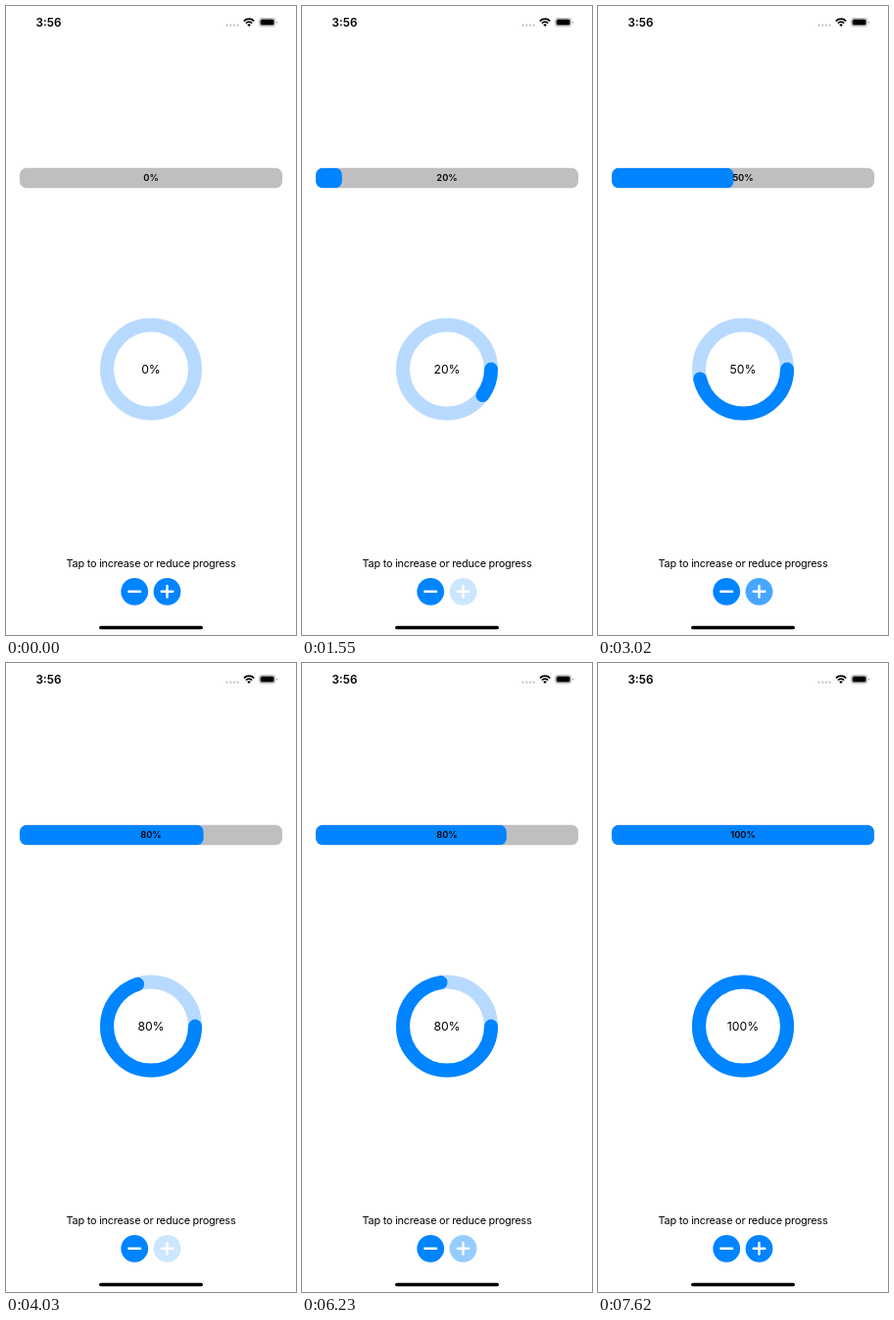
These frames come from a looping animation (296x640 px, 7.69 s). An HTML page:

```html
<!DOCTYPE html>
<html lang="en">
<head>
<meta charset="utf-8">
<title>Progress</title>
<style>
  html, body { margin: 0; width: 100%; height: 100%; overflow: hidden; background: #fff; }
  svg { display: block; width: 296px; height: 640px; }
  text { font-family: Inter, "Liberation Sans", sans-serif; text-anchor: middle; fill: #000; }
  .accent { fill: #0084ff; }
  .glyph { stroke: #fff; stroke-width: 2.4; stroke-linecap: round; }
  .ring { fill: none; stroke-width: 14; }
</style>
</head>
<body>
<svg viewBox="0 0 296 640">
  <defs>
    <clipPath id="barClip"><rect x="14" y="164.7" width="268" height="20.6" rx="7"/></clipPath>
  </defs>

  <text x="43.5" y="21" font-size="11.7" font-weight="600">3:56</text>
  <g fill="#c4c4c6">
    <circle cx="225.4" cy="19.6" r="1.2"/><circle cx="229.2" cy="19.6" r="1.2"/>
    <circle cx="233" cy="19.6" r="1.2"/><circle cx="236.7" cy="19.6" r="1.2"/>
  </g>
  <g fill="none" stroke="#000" stroke-width="1.7">
    <path d="M242.8 15.3a7.3 7.3 0 0 1 10.4 0"/>
    <path d="M244.8 17.5a4.5 4.5 0 0 1 6.4 0"/>
  </g>
  <path d="M246.2 19.1a2.6 2.6 0 0 1 3.6 0L248 21z"/>
  <rect x="258.4" y="12.4" width="16.4" height="8.4" rx="2.5" fill="none" stroke="#a9a9ab" stroke-width=".8"/>
  <rect x="259.6" y="13.6" width="14" height="6" rx="1.5"/>
  <path d="M275.8 15.2q1.2 .4 1.2 1.4t-1.2 1.4z" fill="#a9a9ab"/>

  <g clip-path="url(#barClip)">
    <rect x="14" y="164" width="268" height="22" fill="#bfbfc1"/>
    <rect id="fill" class="accent" x="14" y="164.7" height="20.6" rx="7"/>
  </g>
  <text id="barText" x="148" y="178.3" font-size="9.3" font-weight="600"></text>

  <circle class="ring" cx="148" cy="369.6" r="45" stroke="#b8daff"/>
  <circle id="arc" class="ring" cx="148" cy="369.6" r="45" stroke="#0084ff" stroke-linecap="round" pathLength="100"/>
  <text id="ringText" x="148" y="374" font-size="12.2"></text>

  <text x="148" y="571" font-size="10.9" letter-spacing="-.22">Tap to increase or reduce progress</text>
  <g id="minus">
    <circle class="accent" cx="131.2" cy="595.8" r="13.9"/>
    <path class="glyph" d="M125.4 595.8h11.6"/>
  </g>
  <g id="plus">
    <circle class="accent" cx="164.5" cy="595.8" r="13.9"/>
    <path class="glyph" d="M158.7 595.8h11.6M164.5 590v11.6"/>
  </g>
  <rect x="95" y="630.8" width="106" height="3.5" rx="1.75"/>
</svg>
<script>
  const LOOP = 7690, EASE_MS = 350, BAR_WIDTH = 268;
  const $ = id => document.getElementById(id);

  // Taps: touch down, release, change in percent
  const taps = [
    [910, 945, 10], [1550, 1550, 10], [1940, 1945, 10], [2400, 2400, 10],
    [2800, 2815, 10], [3240, 3250, 10], [3640, 3645, 10], [4020, 4020, 10],
    [5070, 5180, -10], [6020, 6105, 10], [6600, 6660, 10], [7040, 7150, 10]
  ];

  // Bursts of screen updates: first, last, count
  const bursts = [
    [910, 1350, 5], [1550, 2310, 8], [2420, 2660, 3], [2800, 3460, 7], [3580, 4240, 7],
    [4350, 4470, 2], [5070, 5650, 6], [6020, 6450, 5], [6600, 7270, 7], [7390, 7620, 3]
  ];
  const ticks = [0, ...bursts.flatMap(([from, to, n]) =>
    Array.from({ length: n }, (_, i) =>
      Math.floor((from * (n - 1) + (to - from) * i) / (n - 1) / 10) * 10))];

  // Same curve as CSS ease-in-out
  function easeInOut(x) {
    if (x <= 0) return 0;
    if (x >= 1) return 1;
    let lo = 0, hi = 1, u;
    for (let i = 0; i < 24; i++) {
      u = (lo + hi) / 2;
      const v = 1 - u;
      if (1.26 * u * v * v + 1.74 * u * u * v + u * u * u < x) lo = u; else hi = u;
    }
    return u * u * (3 - 2 * u);
  }

  function stateAt(t) {
    const s = { label: 0, progress: 0, plus: 1, minus: 1 };
    for (const [down, up, step] of taps) {
      if (t < down) break;
      const eased = easeInOut((t - up) / EASE_MS);
      s[step > 0 ? "plus" : "minus"] = 0.2 + 0.8 * eased;
      s.progress += step * eased;
      if (t >= up) s.label += step;
    }
    return s;
  }

  function render(t) {
    const { label, progress, plus, minus } = stateAt(t);
    $("barText").textContent = $("ringText").textContent = label + "%";
    $("fill").setAttribute("width", BAR_WIDTH * progress / 100);
    const arc = $("arc");
    arc.style.display = progress > 0 ? "" : "none";
    arc.setAttribute("stroke-dasharray", progress > 99.99 ? "none" : progress + " 200");
    $("plus").setAttribute("opacity", plus);
    $("minus").setAttribute("opacity", minus);
  }

  const start = performance.now();
  let shown = -1;
  function frame() {
    const t = (performance.now() - start) % LOOP;
    const tick = ticks.findLast(k => k <= t);
    if (tick !== shown) render(shown = tick);
    requestAnimationFrame(frame);
  }
  frame();
</script>
</body>
</html>
```
